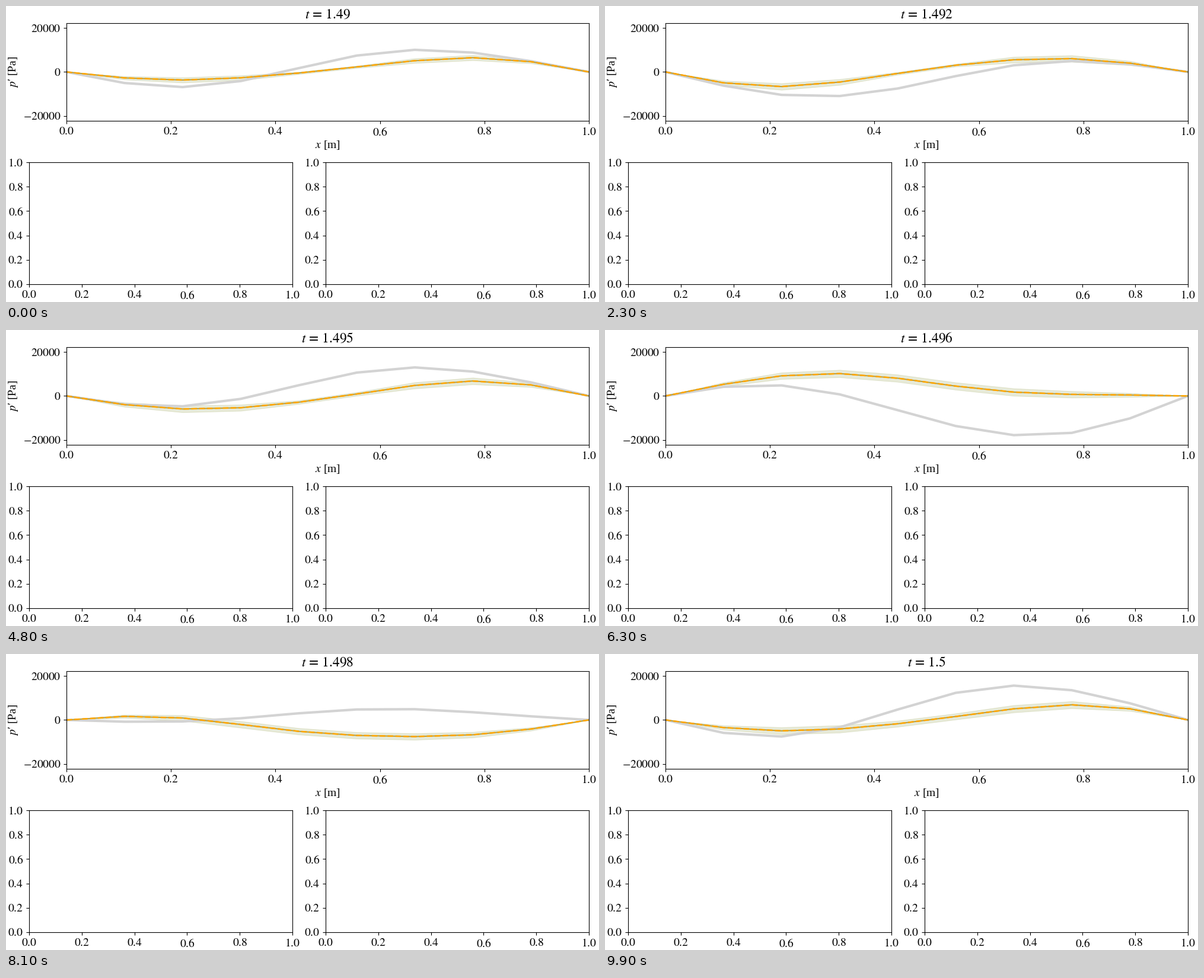
These frames come from a looping animation (1000x500 px, 10 s). A matplotlib script:

```python
import numpy as np
import matplotlib.pyplot as plt
from matplotlib.animation import FuncAnimation

plt.rcParams.update({
    "font.family": "Liberation Serif",
    "font.size": 14,
    "mathtext.fontset": "stix",
    "axes.titlesize": "large",
})

W, H, DPI = 1000, 500, 100
FRAMES = 100
PERIOD = 50            # frames per cycle of the first acoustic mode
UNIT = 269.5           # Pa per amplitude unit

x = np.linspace(0, 1, 10)
modes = np.array([np.sin(j * np.pi * x) for j in range(1, 5)])

# slow growth of the first two mode amplitudes of the true state
KEYS = [0, 13, 23, 26, 38, 48, 63, 81, 99]
AMP1 = [27.6, 29.5, 25.5, 27.5, 32.8, 37.5, 40.1, 44.4, 46.4]
AMP2 = [30.1, 36.0, 36.5, 38.5, 38.1, 37.4, 40.5, 41.4, 43.2]


def wave(j, k, peak):
    """Harmonic j at frame k, with a crest at frame `peak`."""
    return np.cos(2 * np.pi * j * (k - peak) / PERIOD)


def truth(k):
    a1 = np.interp(k, KEYS, AMP1) * wave(1, k, 41.3)
    a2 = np.interp(k, KEYS, AMP2) * wave(2, k, 38.04)
    a3 = -(0.85 + 0.003 * k) * (4 * wave(3, k, 0) + 2.2 * wave(2, k, 0))
    return UNIT * np.array([a1, a2, a3, 0.7]) @ modes


def estimate(k):
    """Ensemble mean and half width of its spread."""
    a1 = 26 * wave(1, k, 61) + 0.4
    a2 = -23.8 * wave(2, k, 47.3)
    a3 = 2.8 * wave(3, k, 14.8)
    a4 = -2 * wave(4, k, 11.7)
    mean = np.array([a1, a2, a3, a4]) @ modes
    s1 = np.hypot(0.24 * a1, 0.05 * k * wave(1, k, 48.5))
    s2 = 0.24 * a2
    return UNIT * mean, UNIT * np.hypot(s1 * modes[0], s2 * modes[1])


fig = plt.figure(figsize=(W / DPI, H / DPI), dpi=DPI, facecolor="white")


def panel(left, right, top, bottom):
    return fig.add_axes([left / W, 1 - bottom / H,
                         (right - left) / W, (bottom - top) / H])


def label_ticks(axis, values, fmt):
    axis.set_ticks(values, [f"${v:{fmt}}$" for v in values])


fifths = np.linspace(0, 1, 6)

ax = panel(102, 983, 28.9, 193.9)
ax.set(xlim=(0, 1), ylim=(-22250, 22250))
label_ticks(ax.xaxis, fifths, ".1f")
label_ticks(ax.yaxis, [-20000, 0, 20000], "d")
ax.set_xlabel("$x$ [m]", labelpad=1.6)
ax.set_ylabel("$p$\u2032 [Pa]")
title = ax.set_title("")

for left, right in ((39, 483), (539, 983)):
    empty = panel(left, right, 263.9, 469.9)
    empty.set(xlim=(0, 1), ylim=(0, 1))
    label_ticks(empty.xaxis, fifths, ".1f")
    label_ticks(empty.yaxis, fifths, ".1f")

band = ax.fill_between(x, 0 * x, 0 * x, color="#7d8c2a", alpha=0.18,
                       lw=0.6, zorder=1)
true_line, = ax.plot(x, 0 * x, color="lightgray", lw=3, zorder=2)
mean_line, = ax.plot(x, 0 * x, color="#b9a040", lw=1.5, zorder=2.1)
dash_line, = ax.plot(x, 0 * x, color="orange", lw=1.8, ls="--", zorder=2.2)


def update(k):
    true_line.set_ydata(truth(k))
    mean, spread = estimate(k)
    mean_line.set_ydata(mean)
    dash_line.set_ydata(mean)
    upper = np.column_stack([x, mean + spread])
    lower = np.column_stack([x, mean - spread])
    band.set_verts([np.vstack([upper, lower[::-1]])])
    title.set_text(rf"$t\,=\,{round(1.49 + 1e-4 * k, 3)}$")
    return true_line, band, mean_line, dash_line, title


anim = FuncAnimation(fig, update, frames=FRAMES, interval=100,
                     init_func=lambda: update(0), repeat=True,
                     repeat_delay=0, blit=False)
plt.show()
```
